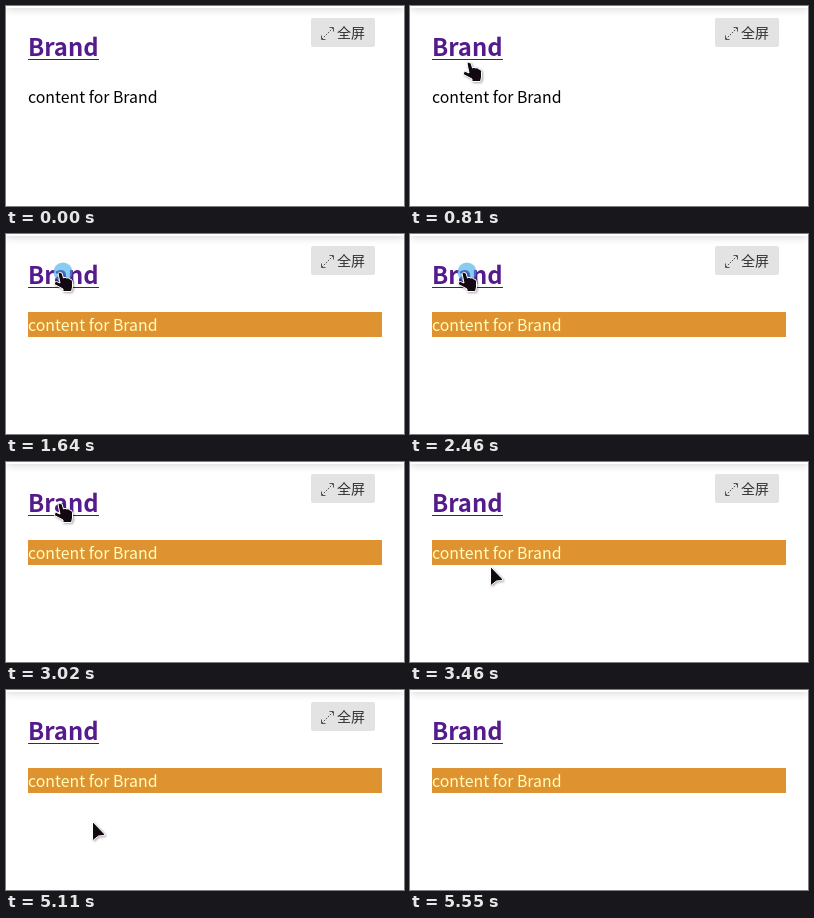
These frames come from a looping animation (398x200 px, 7230 ms). An HTML page:

```html
<!DOCTYPE html>
<html lang="zh">
<head>
<meta charset="utf-8">
<style>
  html, body { margin: 0; width: 100%; height: 100%; overflow: hidden; background: #fff; }
  body { position: relative; }
  header { position: absolute; top: -20px; left: 0; width: 100%; height: 22px; background: #fff; box-shadow: 0 1px 8px rgba(0, 0, 0, .17); }
  svg { position: absolute; top: 0; left: 0; width: 100%; height: 100%; overflow: hidden; font: 15.85px "Noto Sans CJK SC", "Noto Sans CJK", "Noto Sans", sans-serif; }
  .title { font-size: 23.8px; font-weight: 700; fill: #551a8b; }
  .label { font-size: 14px; fill: #333; }
  .active { fill: #ffffc0; }
  .cursor path { fill: #120812; stroke: #fff; stroke-linejoin: round; }
  .cursor { filter: drop-shadow(1px 1px 1px rgba(0, 0, 0, .35)); }
</style>
</head>
<body>
<header></header>
<svg viewBox="0 0 398 200">
  <text class="title" x="22" y="50">Brand</text>
  <path d="M22 53.5H93" stroke="#333"/>
  <rect id="focus" x="21.5" y="21.5" width="72" height="35" fill="none" stroke="#551a8b" stroke-dasharray="1"/>
  <rect id="bar" x="22" y="78" width="354" height="25" fill="#df9230"/>
  <text id="content" x="22" y="97">content for Brand</text>
  <g id="button">
    <rect x="305" y="12" width="64" height="29" rx="2" fill="#e3e3e3"/>
    <g fill="none" stroke="#555">
      <path d="M323.5 21.5H327.5V25.5M315.5 29.5V33.5H319.5"/>
      <path d="M327 22L316 33" stroke-dasharray="1.6 1.2"/>
    </g>
    <text class="label" x="331" y="32">全屏</text>
  </g>
  <circle id="ring" fill="#3aa7e8"/>
  <g id="cursor" class="cursor">
    <path id="arrow" d="M.5 .5L12.5 13V14.5L6.5 15L1.5 19L.5 18.5Z"/>
    <path id="hand" d="M-3 1.5Q-2-.5 1 1L2.5 6Q4 4.5 5.5 6Q7.5 5 8.5 7Q11 6.5 11.5 9.5V15L10.5 19.5H2V17L-6.5 12.5Q-7.5 9.5-4.5 9.5L-1 11Z"/>
  </g>
</svg>
<script>
const LOOP = 7230;
const $ = id => document.getElementById(id);
const show = (id, on) => $(id).style.display = on ? "" : "none";

// Pointer path: time, x, y
const path = [
  [610, 94, 76], [810, 60, 56], [1090, 55, 38], [2900, 55, 38],
  [3020, 55, 41], [3100, 54, 45], [3460, 80, 104], [3820, 86, 131],
  [5110, 86, 131], [5350, 142, 202]
];
// Clicks: start, duration
const clicks = [[1560, 320], [2380, 320], [3900, 200]];

function pointer(t) {
  const i = Math.max(1, path.findIndex(p => p[0] > t));
  const [t0, x0, y0] = path[i - 1], [t1, x1, y1] = path[i];
  const k = (t - t0) / (t1 - t0);
  return [x0 + (x1 - x0) * k, y0 + (y1 - y0) * k];
}

function draw(t) {
  const visible = t >= 610 && t < 5350;
  const [x, y] = visible ? pointer(t) : [0, 0];
  const onLink = x > 22 && x < 93 && y < 57;
  const click = clicks.find(([start, length]) => t >= start && t < start + length);
  const active = t >= 1640;

  show("cursor", visible);
  show("hand", onLink);
  show("arrow", !onLink);
  $("cursor").setAttribute("transform", `translate(${Math.round(x)} ${Math.round(y)})`);

  show("ring", click);
  if (click) {
    const p = (t - click[0]) / click[1];
    $("ring").setAttribute("cx", x + 2);
    $("ring").setAttribute("cy", y);
    $("ring").setAttribute("r", 6 + 7 * Math.sqrt(p));
    $("ring").setAttribute("opacity", .8 * (1 - p));
  }

  show("focus", click && onLink && t - click[0] < 80);
  show("bar", active);
  $("content").setAttribute("class", active ? "active" : "");
  show("button", t < 5550);
}

function tick() {
  draw(performance.now() % LOOP);
  requestAnimationFrame(tick);
}
tick();
</script>
</body>
</html>
```
